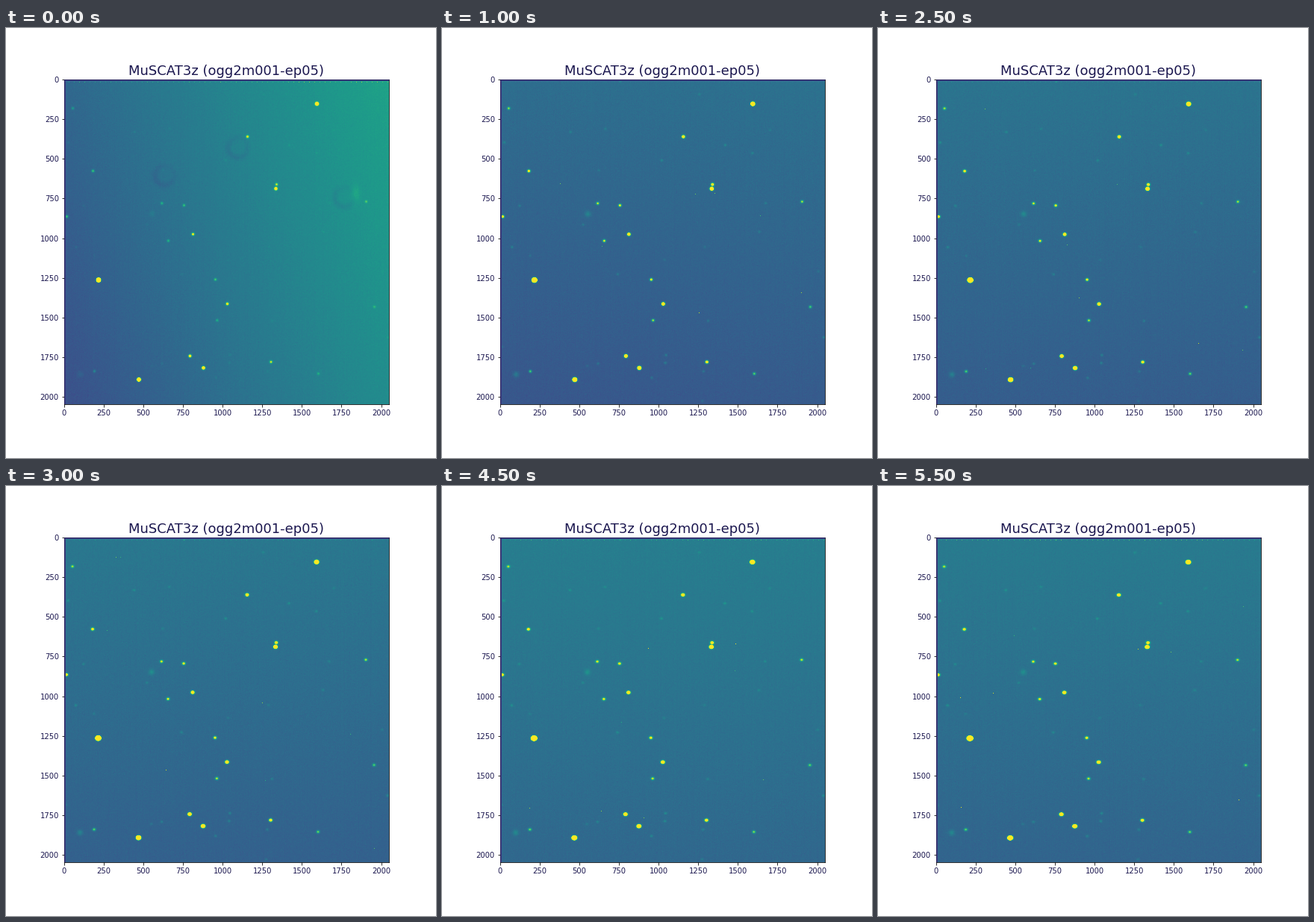
A matplotlib script that plays this animation: 576 by 576 pixels, repeating every 6 s.

```python
import matplotlib.pyplot as plt
import numpy as np
from matplotlib.animation import FuncAnimation

STAGE, DPI = 576, 72
FRAMES, INTERVAL = 12, 500
LEFT, TOP, N = 78, 69, 435
INK = "#1b174f"

# Star positions from brightest to faintest; brightness follows the rank.
STARS = [
    (123.5, 337), (177.5, 470.4), (416, 101), (264, 454.8), (361, 214.7),
    (246, 438.8), (296, 369), (250, 275.7), (323, 145), (354.5, 446.8),
    (362, 209), (81, 252), (116, 191), (280, 336.4), (238, 237),
    (217, 284.5), (208.3, 234.3), (282.4, 391), (482, 232), (89, 107),
    (418, 462.5), (118, 459.3), (493, 373),
]
GALAXIES = [(195, 248.5), (99, 463.5)]
DUST_RINGS = [(310, 160), (212, 197), (453, 226)]

px = LEFT + np.arange(N)
py = TOP + np.arange(N)
X, Y = np.meshgrid(px, py)


def blob(x, y, peak, sx, sy):
    return peak * np.outer(np.exp(-((py - y) / sy) ** 2 / 2),
                           np.exp(-((px - x) / sx) ** 2 / 2))


def dust_ring(x, y):
    """Out-of-focus dust shadow, darkest on its lower left."""
    dx, dy = X - x, Y - y
    r = np.hypot(dx, dy)
    side = .65 + .25 * (dy - dx) / (r + 1)
    return -.045 * side * np.exp(-((r - 13) / 4) ** 2)


def star_field(frame, gain):
    """Stars drift slowly and trail a little more in every exposure."""
    rng = np.random.default_rng(7)
    dx, dy, stretch = -.08 * frame, .04 * frame, 1 + .02 * frame
    field = np.zeros((N, N))
    for rank, (x, y) in enumerate(STARS, 1):
        field += blob(x + dx, y + dy, 36 / rank ** 1.4, 1.3 * stretch, 1.3)
    for x, y in GALAXIES:
        field += blob(x + dx, y + dy, .13, 2.6, 2.6)
    for x, y in rng.uniform((LEFT, TOP), (LEFT + N, TOP + N), (30, 2)):
        field += blob(x + dx, y + dy, rng.uniform(.05, .13), 1.2 * stretch, 1.2)
    return gain * field


def exposure(frame):
    rng = np.random.default_rng(frame + 40)
    twilight = np.exp(-1.3 * frame)
    u, w = (X - LEFT) / N, (Y - TOP) / N

    level = .395 - .03 * np.cos(2 * np.pi * (frame - 2.5) / 13)
    sky = level - .09 * w + .07 * twilight ** 2 + .24 * twilight * (u - .5)
    sky += rng.normal(0, .009, (N, N)) + rng.normal(0, .002, N)
    sky += star_field(frame, 1 - .6 * twilight ** 2)

    shadows = sum(dust_ring(x, y) for x, y in DUST_RINGS)
    sky += twilight ** 3 * (shadows + blob(468, 222, .08, 4, 8))

    # Cosmic-ray hits
    for _ in range(round(8 * (1 - twilight))):
        x, y = rng.integers(10, N - 10, 2)
        sky[y, x] = rng.uniform(.6, 1)

    # Hot pixels and dark border of the sensor
    hot = np.arange(6, N, 7)
    strength = .025 * frame + .25 * twilight ** 2
    sky[3, hot] += strength * rng.uniform(.4, 1.2, len(hot))
    sky[:2] = sky[:, :2] = .2
    return sky


plt.rcParams["font.family"] = "DejaVu Sans"
fig = plt.figure(figsize=(STAGE / DPI, STAGE / DPI), dpi=DPI, facecolor="white")
ax = fig.add_axes([.135, .125, .755, .755])
exposures = [exposure(frame) for frame in range(FRAMES)]
picture = ax.imshow(exposures[0], extent=(-.5, 2047.5, 2047.5, -.5),
                    cmap="viridis", vmin=0, vmax=1,
                    interpolation="nearest", aspect="auto")

ticks = np.arange(0, 2001, 250)
ax.set_xticks(ticks)
ax.set_yticks(ticks)
ax.tick_params(labelsize=10, labelcolor=INK)
ax.set_title("MuSCAT3z (ogg2m001-ep05)", fontsize=18, color=INK)
for side in ("left", "top"):
    ax.spines[side].set_color(INK)


def update(frame):
    picture.set_data(exposures[frame])
    return [picture]


animation = FuncAnimation(fig, update, frames=FRAMES, interval=INTERVAL,
                          repeat=True, repeat_delay=0)
plt.show()
```
